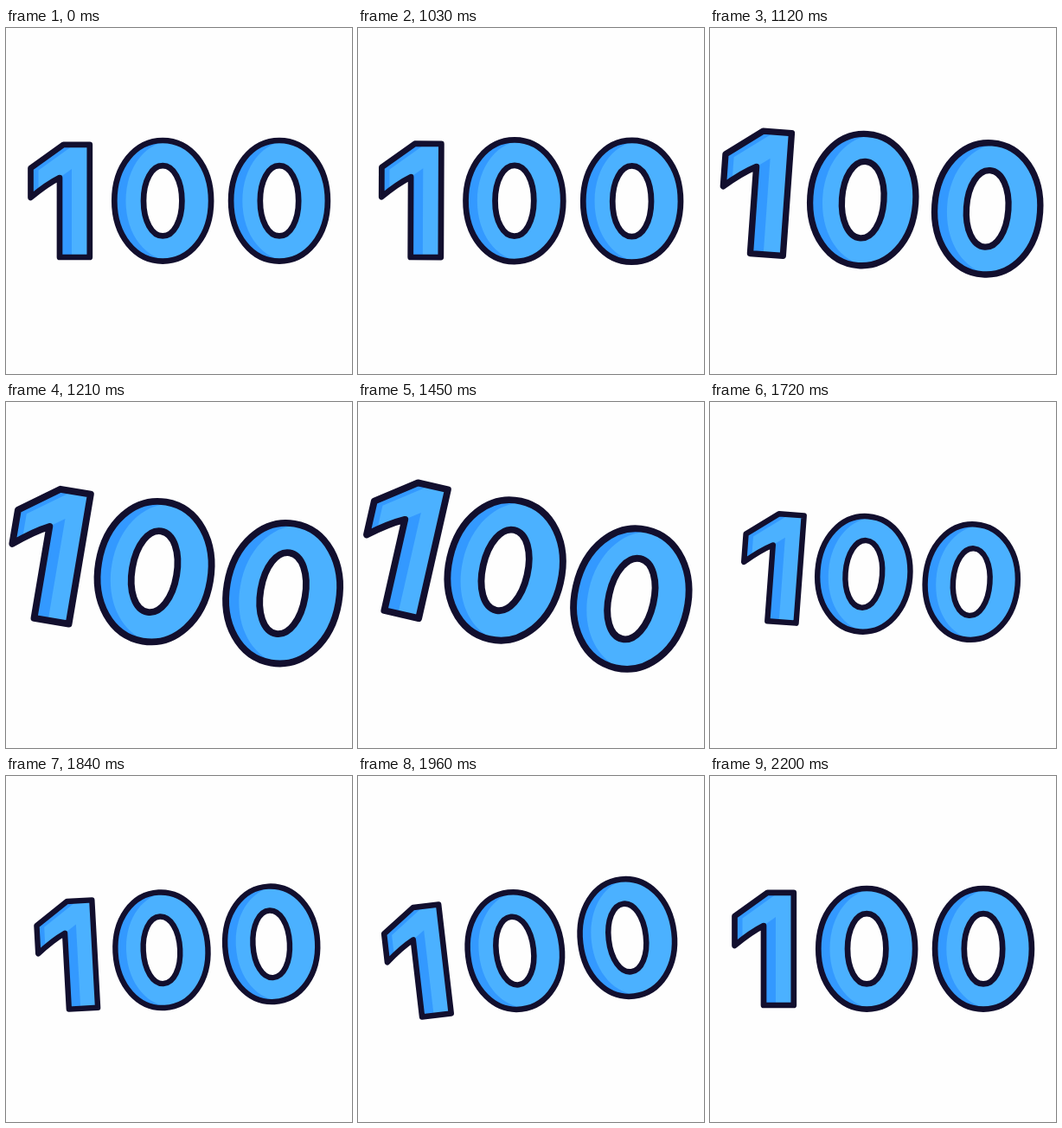
Write an HTML page with a canvas that moves like this. It is 400 px wide and 400 px high and loops after 2230 ms.

```html
<!DOCTYPE html>
<html lang="en">
<head>
<meta charset="utf-8">
<title>100</title>
<style>
  html, body { margin: 0; width: 100%; height: 100%; overflow: hidden; background: #fefefe; }
  canvas { display: block; width: 400px; height: 400px; }
</style>
</head>
<body>
<canvas id="stage" width="400" height="400"></canvas>
<script>
const ctx = document.getElementById('stage').getContext('2d');
const LOOP = 2230, START = 1030, END = 2200, STEP = 30;
const LINE = '#120f2e', LIGHT = '#4bb1ff', SHADE = '#3399ff', PAPER = '#fefefe';

const ONE = new Path2D(
  'M28.5 162 L66.5 134.8 H96.8 V265 H62 V173 Q47 180.5 28.5 196 Z');
const ONE_LIGHT = new Path2D(
  'M37.5 164.5 L80 134 H98 V266 H76 V163 Q66 170 55 178 L37.5 200 Z');

// Rounded oval, a little fuller than an ellipse.
function oval(path, cx, cy, rx, ry) {
  const k = 0.572, kx = rx * k, ky = ry * k;
  path.moveTo(cx, cy - ry);
  path.bezierCurveTo(cx + kx, cy - ry, cx + rx, cy - ky, cx + rx, cy);
  path.bezierCurveTo(cx + rx, cy + ky, cx + kx, cy + ry, cx, cy + ry);
  path.bezierCurveTo(cx - kx, cy + ry, cx - rx, cy + ky, cx - rx, cy);
  path.bezierCurveTo(cx - rx, cy - ky, cx - kx, cy - ry, cx, cy - ry);
  path.closePath();
}

function zero(cx) {
  const shape = new Path2D(), light = new Path2D();
  oval(shape, cx, 199.8, 55.9, 69.8);
  oval(shape, cx, 199.8, 22.2, 40.6);
  oval(light, cx + 13.2, 199.8, 55.9, 69.8);
  return { shape, light };
}

// slide: how far each digit closes up while the group is tilted
const DIGITS = [
  { shape: ONE, light: ONE_LIGHT, slide: 4.6 },
  { ...zero(181.2), slide: -7.1 },
  { ...zero(316), slide: -14.4 }
];

const TILT = [[1005, 0], [1310, 12.8], [1515, 12.8], [1960, -6.6], [2200, 0]];
const SQUEEZE = [[1005, 0], [1290, 1], [1480, 1], [2050, 0]];
const SCALE = [[1000, 1], [1230, 1.172], [1480, 1.172], [1745, 0.952], [2200, 1]];

// Ease in and out: cubic-bezier(.33, 0, .67, 1), whose x runs almost linearly.
const ease = u => u * u * (3 - 2 * u);

function valueAt(keys, t) {
  const next = keys.findIndex(key => key[0] > t);
  if (next < 0) return keys[keys.length - 1][1];
  if (next === 0) return keys[0][1];
  const [t0, a] = keys[next - 1], [t1, b] = keys[next];
  return a + (b - a) * ease((t - t0) / (t1 - t0));
}

function drawDigit({ shape, light, slide }, squeeze) {
  ctx.save();
  ctx.translate(slide * squeeze, 1.2 * squeeze);
  ctx.fillStyle = SHADE;
  ctx.fill(shape, 'evenodd');
  ctx.save();
  ctx.clip(shape, 'evenodd');
  ctx.fillStyle = LIGHT;
  ctx.fill(light);
  ctx.restore();
  ctx.stroke(shape);
  ctx.restore();
}

function draw(time) {
  let t = time % LOOP;
  const moving = t >= START && t < END;
  t = moving ? START + Math.floor((t - START) / STEP) * STEP : 0;
  const scale = valueAt(SCALE, t), squeeze = valueAt(SQUEEZE, t);

  ctx.fillStyle = PAPER;
  ctx.fillRect(0, 0, 400, 400);
  ctx.save();
  ctx.translate(200, 200);
  ctx.rotate(valueAt(TILT, t) * Math.PI / 180);
  ctx.scale(scale, scale);
  ctx.translate(-200, -200);
  ctx.strokeStyle = LINE;
  ctx.lineWidth = 6.7;
  ctx.lineJoin = 'round';
  DIGITS.forEach(digit => drawDigit(digit, squeeze));
  ctx.restore();
}

const begin = performance.now();
function tick() {
  draw(performance.now() - begin);
  requestAnimationFrame(tick);
}
tick();
</script>
</body>
</html>
```
